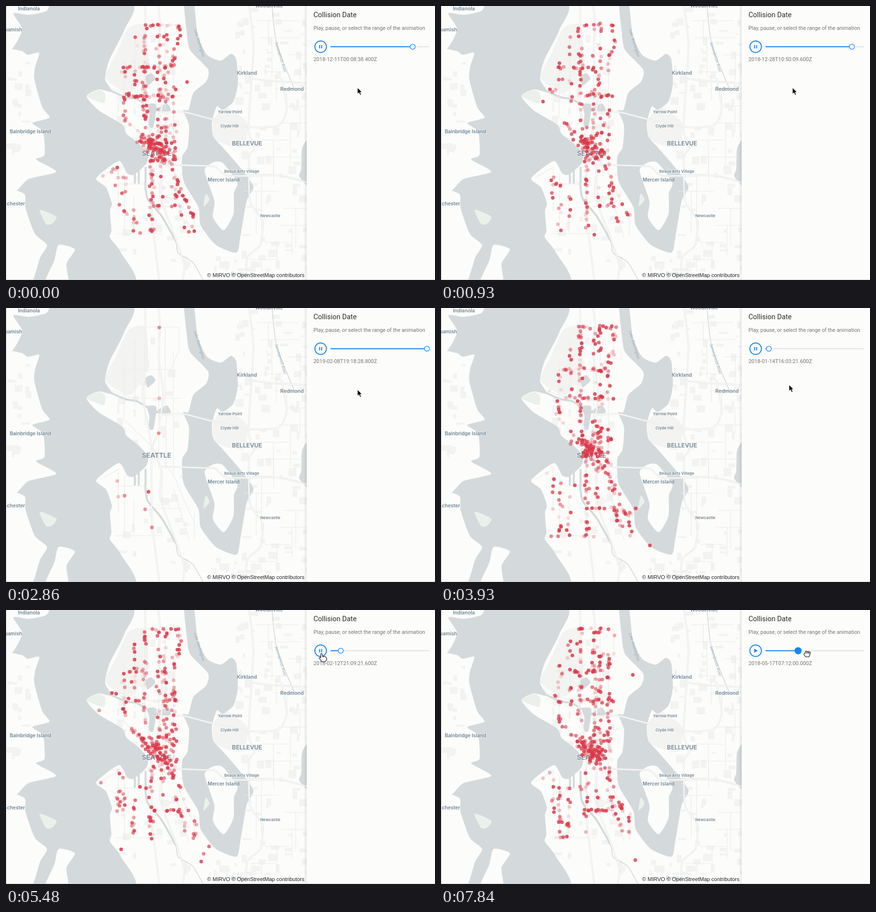
Recreate the animation shown at these times as an HTML page with a canvas. Size 879x562 px, loop 7.99 s.

```html
<!DOCTYPE html>
<html lang="en">
<head>
<meta charset="utf-8">
<title>Collision Date</title>
<style>
html, body { margin: 0; width: 100%; height: 100%; overflow: hidden; background: #fcfcfa; }
svg, canvas { position: absolute; left: 0; top: 0; }
path { fill: none; stroke-linejoin: round; stroke-linecap: round; }
.water { fill: #d4dadc; }
.land { fill: #fcfcfa; }
.urban { fill: #f3f3f1; }
.park { fill: #ebf0eb; }
.canal { stroke: #d4dadc; stroke-width: 4; }
.brook { stroke: #d4dadc; stroke-width: 1.6; }
.minor { stroke: #ececea; stroke-width: 1.2; }
.casing { stroke: #e5e7e6; stroke-width: 3.4; }
.inner { stroke: #fafaf9; stroke-width: 1.7; }
.label { font-family: Inter, "Open Sans", sans-serif; font-weight: 600; fill: #6f8696; stroke: #fcfcfa; stroke-width: 1.6px; stroke-opacity: .7; paint-order: stroke; }
.river { font: italic 8px "Open Sans", sans-serif; fill: #94a4ae; }
.ui { font-family: Roboto, sans-serif; font-size: 10.8px; fill: #747474; }
.blue { stroke: #1785fb; stroke-width: 2; stroke-linecap: butt; }
.cursor path { fill: #fff; stroke: #000; stroke-width: 1.1; }
</style>
</head>
<body>
<svg id="map" width="879" height="562"></svg>
<canvas id="dots" width="616" height="562"></canvas>
<svg width="879" height="562">
  <defs><linearGradient id="shade"><stop stop-color="#000" stop-opacity="0"/><stop offset="1" stop-color="#000" stop-opacity=".09"/></linearGradient></defs>
  <rect x="408" y="544" width="208" height="18" fill="#fff" opacity=".6"/>
  <text x="611.5" y="556" text-anchor="end" font-family="Liberation Sans, Arial, sans-serif" font-size="11" fill="#222">© MIRVO © OpenStreetMap contributors</text>
  <rect x="610" width="6" height="562" fill="url(#shade)"/>
  <rect class="land" x="616" width="263" height="562"/>
  <path d="M.5 0V561.5H879" stroke="#c9cbcb"/>
  <text class="ui" x="630" y="23" style="font-size:14.4px;fill:#2c2c2c">Collision Date</text>
  <text class="ui" x="630" y="49">Play, pause, or select the range of the animation</text>
  <text class="ui" x="630" y="113" id="stamp"></text>
  <circle class="blue" cx="644.7" cy="83.5" r="11.8" fill="#fff"/>
  <path id="pause" class="blue" d="M642.5 80v7m4.2 0v-7"/>
  <path id="play" d="M641.8 79.3l7.2 4.2l-7.2 4.2z" style="fill:#1785fb"/>
  <path d="M665 83.5H866" stroke="#e2e3e3" stroke-width="1.8"/>
  <path id="bar" class="blue"/>
  <circle id="knob" cy="83.5" stroke="#1785fb" stroke-width="1.3"/>
  <g class="cursor">
    <path id="arrow" style="fill:#000;stroke:#fff" d="M0 0v14l3.2 -3l2.3 5l2.5 -1l-2.2 -5h4.2z"/>
    <path id="point" d="M-1 0q2 -2 3 1l1 5q5 -3 8 3v3l-3 4h-7l-5 -7q0 -3 3 -1z"/>
    <path id="open" d="M-2 8l-4 -6q0 -3 3 -1l-2 -6q1 -2 3 1q1 -6 3 -1q3 -4 3 2q3 -2 3 1l-3 10zM-1 -4v4m2 0v-4m3 1v3"/>
    <path id="fist" d="M-3 6l-3 -4q-1 -3 2 -3q0 -7 5 -3q4 -2 5 1q2 0 0 3l-2 6zM-1 -4v3m3 0v-3m2 1v2"/>
  </g>
</svg>
<script>
const LOOP = 7990, DAY = 864e5, START = Date.UTC(2018, 0, 1), SPAN = 411;
const $ = id => document.getElementById(id);
const ctx = $('dots').getContext('2d');

let seed = 20181;
function rnd() {
  seed = seed + 0x6d2b79f5 | 0;
  let v = Math.imul(seed ^ seed >>> 15, 1 | seed);
  v ^= v + Math.imul(v ^ v >>> 7, 61 | v);
  return ((v ^ v >>> 14) >>> 0) / 4294967296;
}
const spread = w => (rnd() + rnd() + rnd() - 1.5) * w;

// Smooth path through a few points
function curve(text, closed) {
  const p = text.split(' ').map(s => s.split(',').map(Number)), n = p.length;
  const get = i => closed ? p[(i + n) % n] : p[Math.max(0, Math.min(n - 1, i))];
  let d = `M${p[0]}`;
  for (let i = 0; i < (closed ? n : n - 1); i++) {
    const [a, b, c, e] = [-1, 0, 1, 2].map(k => get(i + k));
    d += `C${b.map((v, j) => v + (c[j] - a[j]) / 9)} ${c.map((v, j) => v - (e[j] - b[j]) / 9)} ${c}`;
  }
  return d;
}
const area = (cls, pts) => `<path class="${cls}" d="${curve(pts, true)}"/>`;
const line = (cls, pts) => `<path class="${cls}" d="${curve(pts)}"/>`;
const blocks = (n, x0, y0, w, h) => Array.from({ length: n }, () =>
  `<rect class="urban" x="${x0 + rnd() * w | 0}" y="${y0 + rnd() * h | 0}" width="${4 + rnd() * 15 | 0}" height="${4 + rnd() * 14 | 0}"/>`).join('');
const label = (text, x, y, size = 8.1, anchor = 'middle') =>
  `<text class="label" x="${x}" y="${y}" font-size="${size}" text-anchor="${anchor}">${text}</text>`;
const river = (text, x, y) => `<text class="river" transform="translate(${x} ${y}) rotate(73)">${text}</text>`;

// City streets: fixed coordinate, from, to, weight
const avenues = [[285, 39, 240, 4], [264, 65, 200, 2], [242, 110, 230, 2], [326, 40, 210, 3], [354, 40, 90, 3],
  [343, 90, 345, 2], [313, 40, 330, 2], [298, 310, 465, 4], [328, 225, 330, 2], [320, 330, 400, 2],
  [243, 345, 470, 2], [230, 330, 420, 2], [262, 390, 465, 2], [386, 420, 472, 2]];
const crossings = [[39, 285, 355, 3], [126, 242, 340, 3], [185, 262, 360, 3], [365, 225, 290, 1],
  [411, 300, 360, 3], [467, 225, 320, 1]];
const slants = [[318, 310, 345, 345, 3], [345, 345, 365, 395, 3], [365, 395, 386, 440, 3], [343, 370, 375, 475, 2],
  [243, 230, 300, 285, 3], [193, 352, 228, 332, 1], [218, 170, 262, 185, 2], [353, 90, 336, 130, 3]];
const streets = [...avenues.map(([x, a, b, w]) => [x, a, x, b, w]),
  ...crossings.map(([y, a, b, w]) => [a, y, b, y, w]), ...slants];

function drawMap() {
  const roads = ['312,0 316,40 313,100 322,180 310,260 300,285 318,330 316,390 345,470 365,530 362,562',
    '285,0 286,120 280,180 297,280 299,430 314,562',
    '313,220 362,217 410,229 495,248 558,245 575,212 565,150',
    '318,325 410,328 430,330 455,348 560,348 616,362',
    '498,0 507,85 497,250 509,290 498,310 500,400 525,440 521,490 495,515 490,562',
    '503,149 560,155 616,158'];
  const lanes = Array.from({ length: 15 }, (_, i) => {
    const x = 505 + rnd() * 100, y = 30 + i * 35;
    return `M${x} ${y}v${40 + rnd() * 60}M${x - 25} ${y}h${40 + rnd() * 50}`;
  });
  const grid = streets.map(([a, b, c, d]) => `M${a} ${b}L${c} ${d}`);
  $('map').innerHTML = '<rect class="land" width="616" height="562"/>' +
    blocks(95, 470, 0, 146, 560) + blocks(28, 225, 0, 140, 300) + blocks(24, 220, 340, 150, 220) + blocks(10, 400, 510, 120, 40) +
    area('urban', '251,45 286,40 290,120 255,178 204,148 226,98') +
    area('urban', '424,235 450,208 494,240 485,290 430,275') +
    area('water', '-20,-20 251,-10 243,48 212,110 203,150 218,176 190,171 165,185 190,214 238,243 247,262 274,284 291,305 287,324 262,346 248,343 231,318 185,353 205,372 217,405 213,421 216,460 213,475 235,505 258,575 -20,575') +
    area('water', '365,-10 370,50 377,90 414,130 410,155 384,178 374,213 363,214 375,245 372,290 361,310 364,360 394,412 399,450 430,490 472,506 480,475 493,400 507,370 478,329 445,291 425,268 422,238 432,206 444,213 466,196 475,160 472,110 461,98 440,112 412,100 393,60 384,-10') +
    area('land', '-10,-10 84,-10 83,10 48,18 15,15 33,47 17,82 -10,102') +
    area('land', '-10,106 30,92 44,100 68,96 60,124 58,150 74,207 89,229 54,240 76,258 79,305 62,315 103,340 46,355 20,379 -10,365') +
    area('land', '-10,386 37,385 40,414 59,467 84,490 70,516 48,575 -10,575') +
    area('land', '78,575 99,522 108,490 141,499 124,529 127,575') +
    area('land', '424,321 444,322 474,362 467,384 466,427 446,460 424,433 427,400 407,338') +
    blocks(18, 0, 115, 42, 200) +
    area('water', '625,270 607,291 605,334 601,350 625,370') +
    area('water', '289,202 308,203 302,248 292,246 294,222') +
    area('water', '304,215 329,200 337,215') +
    area('water', '286,144 298,138 306,149 290,163') +
    [262, 270, 284].map(x => `<rect class="water" x="${x}" y="330" width="4" height="34"/>`).join('') +
    area('park', '165,185 190,172 203,180 200,199') + area('park', '409,385 417,397 405,411') +
    area('park', '69,418 103,432 95,446 82,447') +
    line('canal', '213,173 245,187 268,191 292,205') + line('canal', '285,362 290,395 319,431 349,484') +
    line('brook', '349,484 353,507 382,525 404,562') + line('brook', '545,0 555,80 592,172') +
    `<path class="minor" d="${grid.join('') + lanes.join('')}"/>` +
    ['casing', 'inner'].map(c => roads.map(r => line(c, r)).join('')).join('') +
    label('Indianola', 47, 9, 10.2) + label('Suquamish', 33, 52, 10.2, 'end') +
    label('Bainbridge Island', 50, 261, 10.1) + label('Manchester', 39, 409, 10.1, 'end') +
    label('SEATTLE', 308.5, 307, 13.7) + label('BELLEVUE', 494, 285.5, 12.2) +
    label('Woodinville', 539, 3, 10.1) + label('Kirkland', 493.5, 141, 10.2) + label('Redmond', 586, 174, 10.4) +
    label('Yarrow Point', 459, 219.5) + label('Clyde Hill', 458, 249) + label('Beaux Arts Village', 483, 341.5) +
    label('Mercer Island', 446, 360, 9.9) + label('Newcastle', 541.5, 433) + label('Renton', 478, 553, 10) +
    river('Lake Washington', 385, 48) + river('Sammamish River', 551, 75);
}

// Collisions cluster at corners along the streets and downtown
const corners = streets.flatMap(([x, y, x2, y2, w]) => {
  const n = Math.ceil(Math.hypot(x2 - x, y2 - y) / 7);
  return Array.from({ length: n * w }, (_, i) => {
    const f = (i % n) / n;
    return [x + (x2 - x) * f, y + (y2 - y) * f];
  });
});

function place() {
  const kind = rnd();
  if (kind < .19) {
    const u = spread(34) * .75, v = spread(22) * .6;
    return [303 + u + v, 286 + u - v];
  }
  if (kind < .25) return [308 + rnd() * 42, 240 + rnd() * 85];
  const [x, y] = corners[rnd() * corners.length | 0];
  return [x + spread(5), y + spread(3)];
}

const events = Array.from({ length: 7700 }, () => [...place(), rnd() * 365]);
// Lone collisions: x, y, day
events.push([428, 487, 14], [416, 485, 46], [405, 500, 47], [400, 516, 45], [236, 491, 43], [191, 206, 48],
  [209, 196, 361], [398, 513, 134], [371, 156, 344], [399, 411, 14], [393, 133, 136],
  [314, 40, 399.3], [314, 185, 410.8], [313, 257, 399], [228, 355, 410.5], [230, 387, 411],
  [243, 385, 399.5], [292, 377, 403], [285, 413, 399], [299, 450, 399.6]);

// Moments at which the picture refreshes: from, to, intervals
const runs = [[0, 0, 1], [150, 1080, 6], [1230, 2270, 7], [2420, 2860, 3], [3020, 3330, 2], [3480, 4520, 7],
  [4670, 4900, 1], [5180, 5780, 4], [6070, 6810, 5], [7110, 7840, 5]];
const ticks = runs.flatMap(([a, b, n]) =>
  Array.from({ length: n + 1 }, (_, i) => Math.round((a + (b - a) * i / n) / 10) * 10));

const day = stamp => (Date.parse(stamp) - START) / DAY;
const stopDay = day('2018-02-18T09:59:45.600Z');
const dates = [[0, day('2018-12-11T00:08:38.400Z')], [930, day('2018-12-28T10:50:09.600Z')],
  [2860, day('2019-02-08T19:18:28.800Z')], [3230, SPAN], [3230, 0], [3930, day('2018-01-14T16:03:21.600Z')],
  [5480, day('2018-02-12T21:09:21.600Z')], [5780, stopDay], [7000, stopDay],
  [7840, day('2018-05-17T07:12:00.000Z')]];
const mouse = [[0, 720, 167], [3480, 720, 167], [3930, 713, 157], [5180, 646, 90],
  [5920, 646, 90], [6810, 687, 88], [7000, 687, 88], [7840, 750, 90]];

function at(keys, t) {
  const i = keys.findIndex(k => k[0] > t);
  if (i < 0) return keys[keys.length - 1].slice(1);
  const a = keys[i - 1], b = keys[i], f = (t - a[0]) / (b[0] - a[0]);
  return a.slice(1).map((v, j) => v + (b[j + 1] - v) * f);
}

function drawDots(now) {
  ctx.clearRect(0, 0, 616, 562);
  ctx.fillStyle = '#db3848';
  for (const [x, y, d] of events) {
    const near = 1 - Math.abs(d - now) / 10;
    if (near <= 0) continue;
    ctx.globalAlpha = Math.min(1, near * 1.2) * .85;
    ctx.beginPath();
    ctx.arc(x, y, 3.7, 0, 7);
    ctx.fill();
  }
}

const show = (id, on) => $(id).setAttribute('visibility', on ? 'visible' : 'hidden');

function render(t) {
  const [now] = at(dates, t), [mx, my] = at(mouse, t);
  const x = 665 + 201 * now / SPAN;
  const paused = t >= 5780, drag = t >= 7110;
  drawDots(now);
  $('stamp').textContent = new Date(Math.round((START + now * DAY) / 1200) * 1200).toISOString();
  $('bar').setAttribute('d', `M665 83.5H${x}`);
  $('knob').setAttribute('cx', x);
  $('knob').setAttribute('r', drag ? 6.6 : 5.2);
  $('knob').setAttribute('fill', drag ? '#1785fb' : '#fff');
  show('pause', !paused);
  show('play', paused);
  const shape = drag ? 'fist' : t < 5180 ? 'arrow' : mx < 680 ? 'point' : 'open';
  for (const id of ['arrow', 'point', 'open', 'fist']) show(id, id === shape);
  $(shape).setAttribute('transform', `translate(${mx} ${my})`);
}

drawMap();
let last = -1;
const begin = performance.now();
function loop() {
  const t = Math.max(0, performance.now() - begin) % LOOP;
  const tick = ticks.filter(k => k <= t).pop();
  if (tick !== last) render(last = tick);
  requestAnimationFrame(loop);
}
loop();
</script>
</body>
</html>
```
